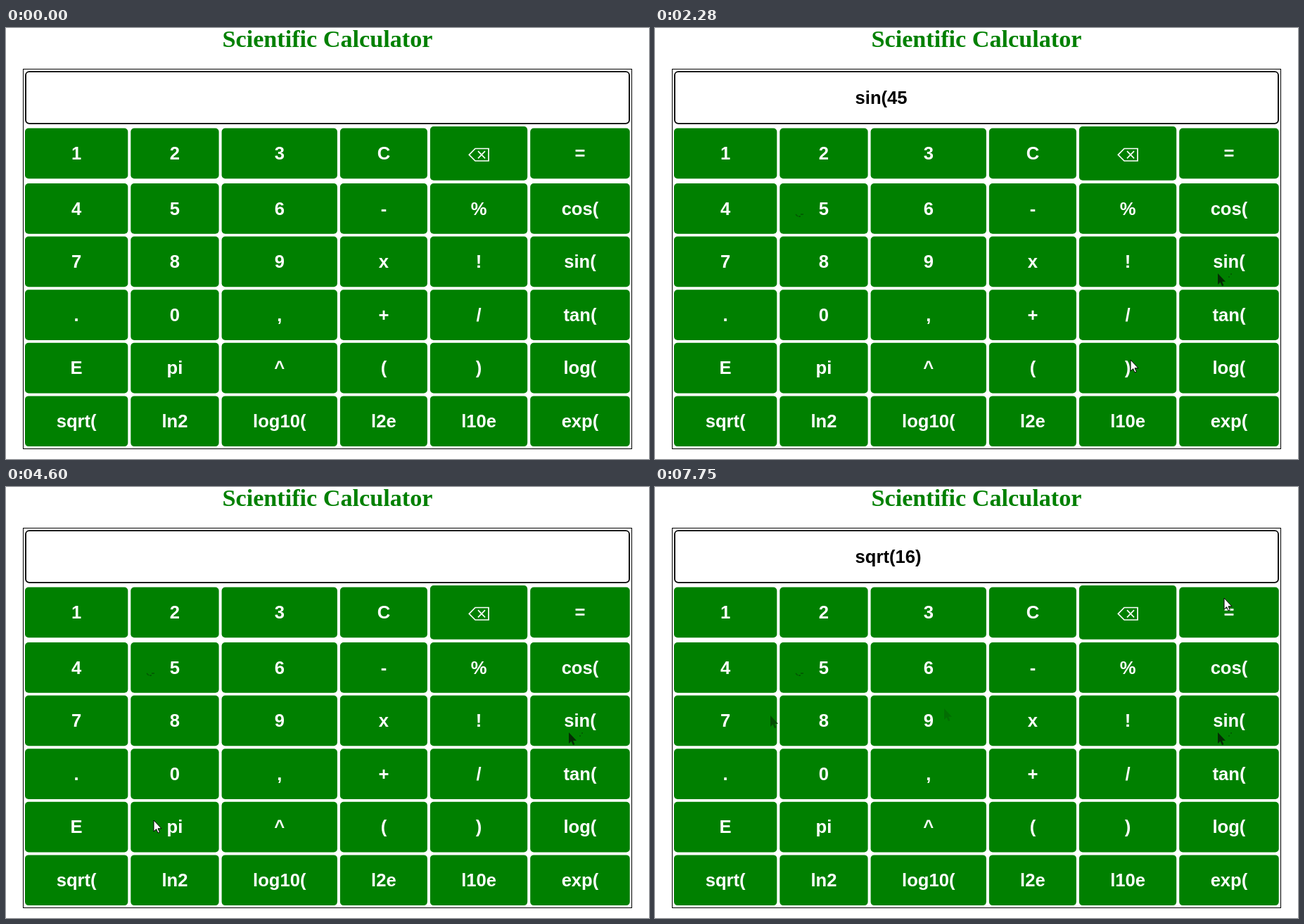
These frames come from a looping animation (914x613 px, 8000 ms). An HTML page:

```html
<!DOCTYPE html>
<html lang="en">
<head>
<meta charset="utf-8">
<title>Scientific Calculator</title>
<style>
  html, body { margin: 0; width: 100%; height: 100%; overflow: hidden; background: #fff; }
  svg { display: block; width: 914px; height: 613px; }
  .title { font: bold 34.2px "Liberation Serif", "Times New Roman", serif; fill: #008000; }
  .key, .screen { font: bold 25.6px "Liberation Sans", Arial, sans-serif; }
  .key { fill: #fff; }
  .title, .key { text-anchor: middle; }
</style>
</head>
<body>
<svg id="stage" viewBox="0 0 914 613" xmlns="http://www.w3.org/2000/svg">
  <defs><path id="arrow" d="M0 0V16L3.6 12.6 6 18 8.4 17 6 11.8H11Z"/></defs>
  <rect width="914" height="613" fill="#fff"/>
  <text class="title" x="457" y="27">Scientific Calculator</text>
  <rect x="24.5" y="58.5" width="865" height="540" fill="none" stroke="#000"/>
  <rect x="28" y="62.2" width="858" height="73.6" rx="5" fill="#fff" stroke="#000" stroke-width="1.8"/>
  <g id="keys"></g>
  <path d="M658.3 180.3L667 171.5H686V189H667ZM671 175.2L681 185.3M681 175.2L671 185.3"
        fill="none" stroke="#fff" stroke-width="1.7"/>
  <text id="screen" class="screen" x="284.6" y="108"></text>
  <g id="trails"></g>
  <use id="cursor" href="#arrow" fill="#fff" stroke="#000" stroke-width="1"/>
</svg>
<script>
const LOOP = 8000, STEP = 200 / 3;
const byId = id => document.getElementById(id);

function add(parent, tag, attrs, text = '') {
  const el = document.createElementNS('http://www.w3.org/2000/svg', tag);
  for (const name in attrs) el.setAttribute(name, attrs[name]);
  el.textContent = text;
  parent.append(el);
  return el;
}

// Keypad: column widths with a fixed gap, evenly spaced rows below the first
const GAP = 4;
const rowTop = r => r ? 221 + (r - 1) * 75.6 : 142.5;
const labels = [
  '1 2 3 C _ =', '4 5 6 - % cos(', '7 8 9 x ! sin(',
  '. 0 , + / tan(', 'E pi ^ ( ) log(', 'sqrt( ln2 log10( l2e l10e exp('
].map(line => line.split(' '));
let left = 27;
[146.3, 125.3, 164.3, 124, 138.3, 141.5].forEach((width, c) => {
  labels.forEach((line, r) => {
    const tall = line[c] === '_', top = rowTop(r);
    add(byId('keys'), 'rect', {
      x: left, y: tall ? 140 : top, width, height: tall ? 76.7 : 71.7, rx: 5, fill: '#008000'
    });
    if (!tall) {
      add(byId('keys'), 'text', { class: 'key', x: left + width / 2, y: Math.round(top + 44.7) }, line[c]);
    }
  });
  left += width + GAP;
});

// Dark marks the pointer leaves behind
function trail(time, tag, attrs) {
  return { time, el: add(byId('trails'), tag, attrs) };
}
const mark = (time, x, y, fill) => trail(time, 'use', { href: '#arrow', x, y, fill });
const speck = (time, d) => trail(time, 'path', { d, stroke: '#035403', fill: 'none', 'stroke-width': 1.3 });
const trails = [
  mark(600, 800, 349, '#052c05'),
  speck(600, 'M815 354h2M818 350h2'),
  speck(1870, 'M200 265l3 3M204 268h3M207 265h4'),
  mark(5320, 164, 325, '#024e02'),
  mark(6320, 411, 315, '#026e02')
];

// Display contents and the times they appear
const entries = [
  [530, 'sin('], [1330, 'sin(4'], [1730, 'sin(45'], [2390, 'sin(45)'],
  [3110, '0.7071067811865475'], [4000, ''], [4920, 'sqrt('],
  [5790, 'sqrt(1'], [6520, 'sqrt(16'], [7120, 'sqrt(16)']
];

// Pointer tip: time, x, y
const route = [
  [67, 841, 545], [267, 805, 372], [400, 800, 349], [533, 799, 349],
  [867, 280, 245], [1067, 199, 244], [1267, 89, 252],
  [1600, 188, 254], [1733, 190, 254], [2267, 676, 472], [2467, 688, 409],
  [2867, 806, 186], [3067, 806, 186], [3267, 768, 220], [3533, 486, 214],
  [3733, 511, 170], [3867, 526, 180], [4000, 524, 182],
  [4800, 106, 571], [4933, 93, 568], [5267, 164, 325], [5567, 130, 146],
  [5700, 118, 156], [6267, 411, 311], [6400, 434, 281], [6667, 450, 293],
  [7067, 681, 468], [7200, 682, 468], [7333, 685, 406],
  [7467, 805, 226], [7600, 805, 226], [7733, 809, 158]
];

function tipAt(t) {
  const i = route.findIndex(p => p[0] > t);
  if (i < 0) return route[route.length - 1].slice(1);
  const [t0, x0, y0] = route[i - 1], [t1, x1, y1] = route[i];
  const k = (t - t0) / (t1 - t0);
  return [x0 + (x1 - x0) * k, y0 + (y1 - y0) * k].map(Math.round);
}

function draw(time) {
  // The picture advances fifteen times a second
  const t = Math.floor((time + 3.4) / STEP) * STEP + 0.5;
  let text = '';
  for (const [start, value] of entries) if (t >= start) text = value;
  byId('screen').textContent = text;
  for (const { time: start, el } of trails) el.style.display = t >= start ? '' : 'none';
  const cursor = byId('cursor'), shown = t >= route[0][0];
  cursor.style.display = shown ? '' : 'none';
  if (shown) cursor.setAttribute('transform', `translate(${tipAt(t)})`);
}

const begin = performance.now();
function tick() {
  draw((performance.now() - begin) % LOOP);
  requestAnimationFrame(tick);
}
tick();
</script>
</body>
</html>
```
